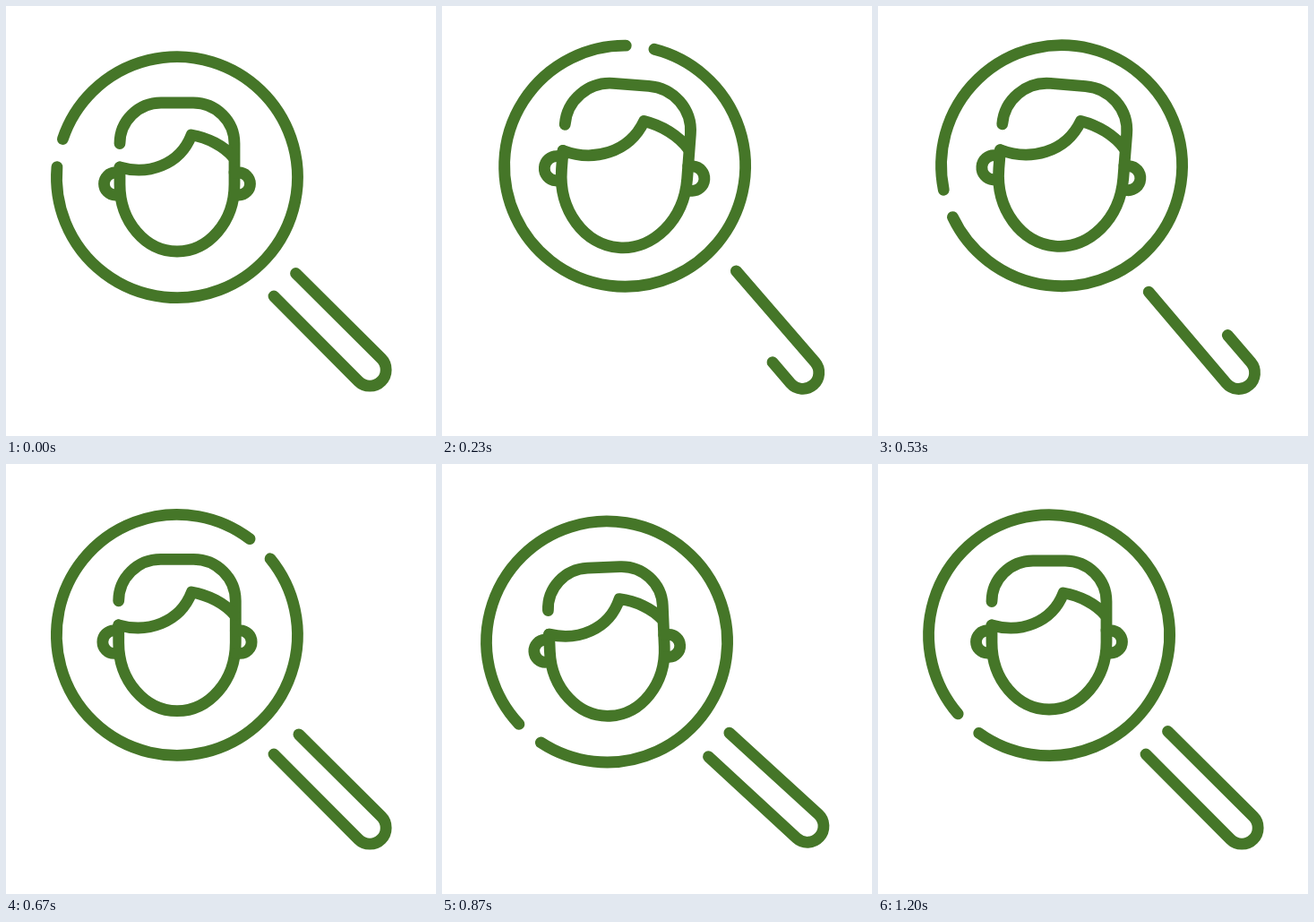
Animation, 480 px wide and 480 px high, one loop 1.53 s. Source, as an HTML page:

```html
<!DOCTYPE html>
<html lang="en">
<head>
<meta charset="utf-8">
<title>Find a person</title>
<style>
  html, body { margin: 0; width: 100%; height: 100%; overflow: hidden; background: #fff; }
  svg { display: block; width: 100vw; height: 100vh; }
  #glass { fill: none; stroke: #457628; stroke-width: 12.8; stroke-linecap: round; stroke-linejoin: round; }
</style>
</head>
<body>
<svg viewBox="0 0 480 480">
  <defs>
    <path id="handle" pathLength="1" d="M323.5 298.5L418.9 393.4A18 18 0 0 1 393.4 418.9L299 324"/>
  </defs>
  <g id="glass">
    <path id="ring" d="M89.2 278.9A134.5 134.5 0 1 1 112.7 300.4"/>
    <g id="head">
      <path d="M127 153.5A46 45.5 0 0 1 173 108H209A46 45.5 0 0 1 255 153.5V199C255 241 226 274 191 274S127 241 127 199V180"/>
      <path d="M127 180C158 189 194 178 207 144C225 147 243 156 254 169"/>
      <path d="M127 186H122A12.4 12.4 0 0 0 122 211H127M255 186H260A12.4 12.4 0 0 1 260 211H255"/>
    </g>
    <use id="near" href="#handle"/>
    <use id="far" href="#handle"/>
  </g>
</svg>
<script>
const LOOP = 1530, STEP = 100 / 3, STROKE = 12.8;
const el = id => document.getElementById(id);
const glass = el('glass'), ring = el('ring'), head = el('head'), near = el('near'), far = el('far');

const span = (x, from, to) => Math.min(1, Math.max(0, (x - from) / (to - from)));
const ease = u => u * u * (3 - 2 * u);
// Half a sine wave between two steps; skew above 1 makes it peak later.
const lobe = (x, from, to, height, skew = 1) => height * Math.sin(Math.PI * span(x, from, to) ** skew);

// The glass swings over, back past rest, and settles.
const tilt = x => lobe(x, 0, 20, 6.2, 1.35) - lobe(x, 20, 27.5, 4.1) + lobe(x, 27.5, 36, 1.4);
const zoom = x => 1 + lobe(x, 0, 21, .122, 1.1);
// Four turns: speeding up, then braking to a stop at step 26.
const spin = x => -Math.min(5.44 * x ** 1.9, 1440 - 13.75 * Math.max(0, 26 - x) ** 1.44);
const gapFront = x => 1 - span(x, 0, 14.13) ** 1.635;
const gapBack = x => 1 - ease(span(x, 7, 21));

function trim(path, from, to) {
  const length = to - from;
  path.style.visibility = length > .001 ? 'visible' : 'hidden';
  path.setAttribute('stroke-dasharray', length >= 1 ? 'none' : `${length} 2`);
  path.setAttribute('stroke-dashoffset', -from);
}

function draw(time) {
  const step = Math.floor((time % LOOP + 3.34) / STEP) % 46;
  const scale = zoom(step);
  glass.setAttribute('transform', `rotate(${tilt(step)} 362 362)`);
  ring.setAttribute('transform', `rotate(${spin(step)} 191 191)`);
  head.setAttribute('transform', `translate(191 191) scale(${scale}) translate(-191 -191)`);
  head.style.strokeWidth = STROKE / scale;
  trim(near, 0, gapFront(step));
  trim(far, gapBack(step), 1);
}

const start = performance.now();
function tick() {
  draw(performance.now() - start);
  requestAnimationFrame(tick);
}
tick();
</script>
</body>
</html>
```
